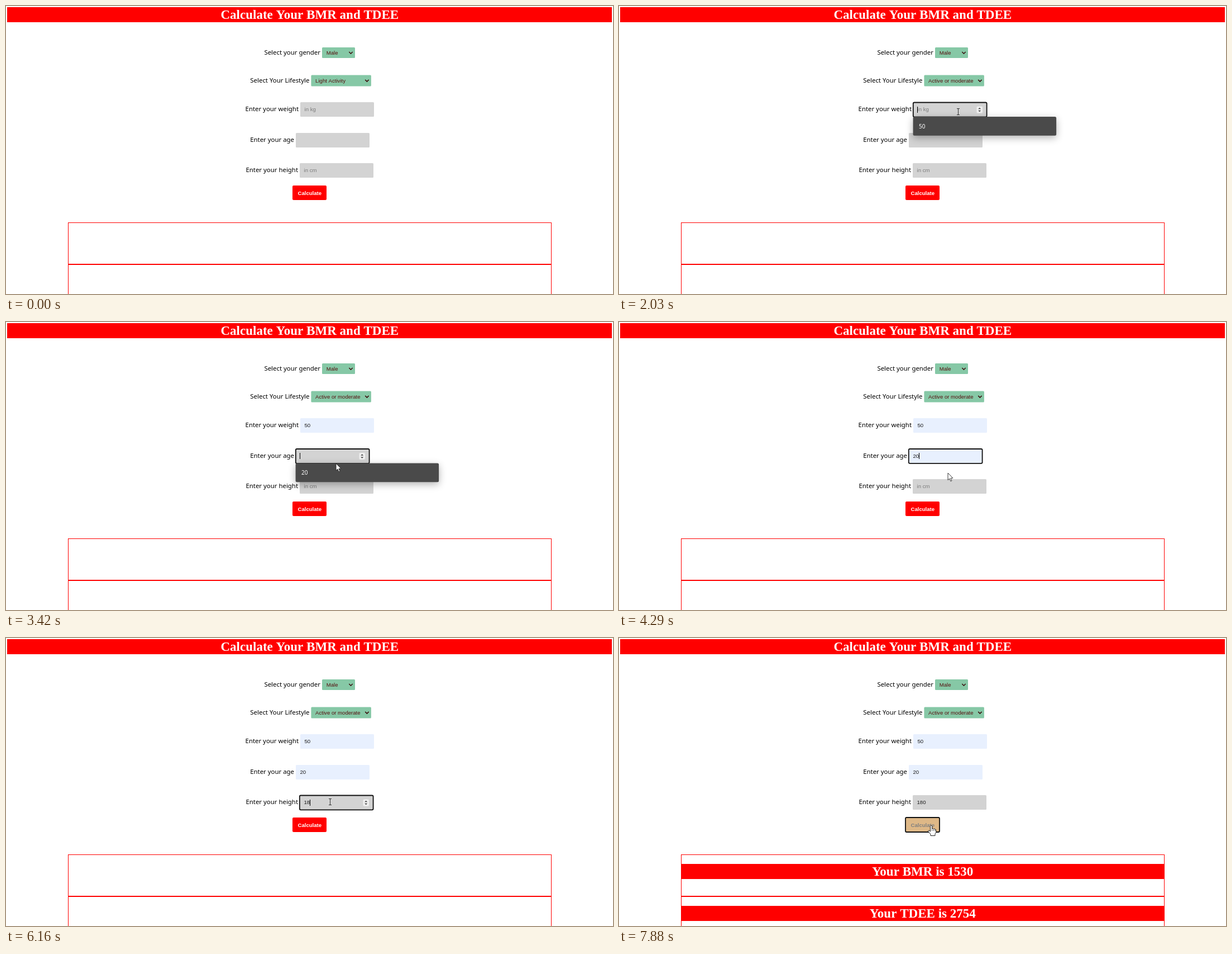
Animation, 1087 px wide and 515 px high, one loop 8 s. Source, as an HTML page with a canvas:

```html
<!DOCTYPE html>
<html lang="en">
<head>
<meta charset="utf-8">
<title>BMR and TDEE calculator</title>
<style>
  html, body { margin: 0; width: 100%; height: 100%; overflow: hidden; background: #fff; }
  canvas { display: block; width: 1087px; height: 515px; }
</style>
</head>
<body>
<canvas id="stage" width="1087" height="515"></canvas>
<script>
const ctx = document.getElementById('stage').getContext('2d');
const LOOP = 8000, STEP = 78, BLINK = 510;
const RED = '#ff0000', GREEN = '#86c8a6', GREY = '#d3d3d3', MAROON = '#560f0f', INK = '#1c1c1c';
const ARIAL = '9.6px "Liberation Sans", Arial, sans-serif';
const SERIF = 'bold 23.05px "Liberation Serif", "Times New Roman", serif';
const LABEL = '11.4px "Noto Sans", sans-serif';
const MENU = '10px "Noto Sans", sans-serif';

// Pointer moves, each starting where the one before ended
const START = { x: 775, y: 452 };
const MOVES = [
  { from: 70, to: 860, x: 594, y: 128 },
  { from: 950, to: 1250, x: 606, y: 174 },
  { from: 1330, to: 1630, x: 607, y: 187 },
  { from: 1780, to: 2030, x: 607, y: 189 },
  { from: 2180, to: 2410, x: 599, y: 212 },
  { from: 2720, to: 3500, x: 590, y: 258 },
  { from: 3600, to: 3980, x: 589, y: 270 },
  { from: 4290, to: 4920, x: 580, y: 293 },
  { from: 7490, to: 7880, x: 559, y: 335 }
];

const OPTIONS = ['Light Activity', 'Active or moderate', 'Vigorously Active'];
const LIST = { x: 546.5, y: 146.5, w: 107.5, row: 25.7, open: 950, close: 1780 };

// focus and blur are clicks; pick takes the offered value, keys type it instead
const FIELDS = [
  { label: 'Enter your weight', x: 527, hint: 'in kg', value: '50', offer: '50',
    focus: 1940, pick: 2720, blur: 3340 },
  { label: 'Enter your age', x: 519, hint: '', value: '20', offer: '20',
    focus: 3340, pick: 3980, blur: 4640 },
  { label: 'Enter your height', x: 526, hint: 'in cm', value: '180', offer: '34',
    focus: 4640, keys: [5700, 6160, 6310], blur: 7800 }
];
FIELDS.forEach((f, i) => { f.y = 172.5 + 54.5 * i; });
const FW = 132, FH = 25.5, MENU_W = 256.5, MENU_H = 33.7, MENU_PAD = 5.5;
const BUTTON = { x: 513, y: 321, w: 61, h: 26, press: 7800, done: 7880 };

const inside = (p, x, y, w, h) => p && p.x >= x && p.x <= x + w && p.y >= y && p.y <= y + h;
const within = (t, a, b) => t >= a && t < b;
const menuOpen = (f, t) => within(t, f.focus + 80, f.pick || f.keys[0]);
const rowHot = (f, t, p) => menuOpen(f, t) &&
  inside(p, f.x, f.y + FH + MENU_PAD, MENU_W, MENU_H - 2 * MENU_PAD);

function pointerAt(t) {
  const i = MOVES.findLastIndex(m => m.from <= t);
  if (i < 0) return null;
  const m = MOVES[i], a = MOVES[i - 1] || START;
  const stepped = Math.floor((t - m.from) / STEP + 0.1) * STEP;
  const k = t >= m.to ? 1 : Math.min(1, stepped / (m.to - m.from));
  return { x: Math.round(a.x + (m.x - a.x) * k), y: Math.round(a.y + (m.y - a.y) * k) };
}

function rect(x, y, w, h, fill, r = 0) {
  ctx.fillStyle = fill;
  ctx.beginPath();
  ctx.roundRect(x, y, w, h, r);
  ctx.fill();
}

function shadowed(x, y, w, h, fill, r, blur, dy, alpha) {
  ctx.save();
  ctx.shadowColor = `rgba(0,0,0,${alpha})`;
  ctx.shadowBlur = blur;
  ctx.shadowOffsetY = dy;
  rect(x, y, w, h, fill, r);
  ctx.restore();
}

function text(s, x, y, font, color, align = 'left') {
  ctx.font = font;
  ctx.fillStyle = color;
  ctx.textAlign = align;
  ctx.fillText(s, x, y);
}

function line(color, width, ...points) {
  ctx.strokeStyle = color;
  ctx.lineWidth = width;
  ctx.beginPath();
  points.forEach(([x, y], i) => i ? ctx.lineTo(x, y) : ctx.moveTo(x, y));
  ctx.stroke();
}

function ring(x, y, w, h) {
  ctx.strokeStyle = '#101010';
  ctx.lineWidth = 1.8;
  ctx.beginPath();
  ctx.roundRect(x, y, w, h, 2);
  ctx.stroke();
}

function banner(s, x, y, w) {
  rect(x, y, w, 27, RED);
  text(s, 543.8, y + 21, SERIF, '#fff', 'center');
}

function select(label, x, y, w, h, value) {
  text(label, x - 3, y + h / 2 + 3.5, LABEL, '#000', 'right');
  rect(x, y, w, h, GREEN, 1.5);
  text(value, x + 7.7, y + h / 2 + 3.5, ARIAL, MAROON);
  const cx = x + w - 7.5, cy = y + h / 2;
  line('#3a0c0c', 1.5, [cx - 3.2, cy - 1.5], [cx, cy + 1.7], [cx + 3.2, cy - 1.5]);
}

function spinner(x, y) {
  rect(x, y, 10.5, 12, '#efefef', 2);
  ctx.fillStyle = '#404040';
  for (const d of [-1, 1]) {
    ctx.beginPath();
    ctx.moveTo(x + 2.7, y + 6 + d * 1.2);
    ctx.lineTo(x + 5.2, y + 6 + d * 3.8);
    ctx.lineTo(x + 7.7, y + 6 + d * 1.2);
    ctx.fill();
  }
}

function field(f, t, p, hover) {
  const { x, y } = f, top = Math.floor(y);
  const focused = within(t, f.focus, f.blur);
  const preview = rowHot(f, t, p) && f.pick, filled = t >= f.pick;
  const typed = (f.keys || []).filter(k => t >= k);
  const value = preview || filled ? f.value : f.value.slice(0, typed.length);

  text(f.label, x - 3, y + 15.5, LABEL, '#000', 'right');
  rect(x, top, FW, 26, preview || filled ? '#e8f0fe' : GREY, 1.5);
  if (focused) ring(x - 0.2, y, FW - 0.2, FH + 0.3);
  if (hover || focused && !filled) spinner(x + FW - 18.5, y + 7);
  text(value || f.hint, x + 7.5, y + 15.8, ARIAL, value ? INK : '#7b7b7b');

  const since = filled ? f.pick : typed.pop() || f.focus;
  if (focused && !preview && Math.floor((t - since) / BLINK) % 2 === 0) {
    const cx = Math.floor(x + 7.5 + (value ? ctx.measureText(value).width : 0));
    rect(cx, Math.round(y + 7), 1, 11, '#000');
  }
}

function menu(f, t, p) {
  if (!menuOpen(f, t)) return;
  const x = f.x - 0.4, y = f.y + FH;
  shadowed(x, y, MENU_W, MENU_H, '#4a4a4a', 2.5, 14, 4, 0.3);
  if (rowHot(f, t, p)) rect(x, y + MENU_PAD, MENU_W, MENU_H - 2 * MENU_PAD, '#575757');
  text(f.offer, x + 10.5, y + 20.8, MENU, '#fff');
}

function list(p) {
  const { x, y, w, row } = LIST;
  shadowed(x, y, w, row * 3, GREEN, 1, 8, 1.5, 0.45);
  const hot = Math.max(0, Math.floor((p.y - y) / row));
  OPTIONS.forEach((s, i) => {
    if (i === hot) rect(x, y + i * row, w, row, '#d0cfcf');
    text(s, x + 7.5, y + i * row + 16.3, ARIAL, i === hot ? INK : MAROON);
  });
}

function button(t, hover) {
  const { x, y, w, h } = BUTTON;
  rect(x, y, w, h, hover ? '#deb887' : RED, 2);
  if (t >= BUTTON.press) ring(x, y, w, h);
  text('Calculate', x + w / 2 + 0.3, y + 16.7, 'bold ' + ARIAL, hover ? '#808080' : '#fff', 'center');
}

function results(t) {
  ['Your BMR is 1530', 'Your TDEE is 2754'].forEach((s, i) => {
    const y = 387 + 75 * i;
    ctx.strokeStyle = RED;
    ctx.lineWidth = 1;
    ctx.strokeRect(111.5, y + 0.5, 865, 74);
    if (t >= BUTTON.done) banner(s, 112, y + 17, 864);
  });
}

function shape(d, width) {
  const path = new Path2D(d);
  ctx.lineJoin = 'round';
  ctx.lineWidth = width;
  ctx.fillStyle = '#fff';
  ctx.strokeStyle = '#222';
  ctx.fill(path);
  ctx.stroke(path);
}

const arrow = () => shape('M0 0V12.6L2.9 10L4.9 14.7L6.9 13.8L5 9.3L8.9 9.1Z', 0.9);

function beam() {
  for (const y of [-5.5, 5.5]) line('#333', 1, [-2, y], [3, y]);
  line('#333', 1, [0.5, -5.5], [0.5, 5.5]);
}

function hand() {
  shape('M-1.5 11V1.5Q0-1.5 1.5 1.5V6Q3.5 4.5 4.3 6.4Q6.5 5.3 7 7.2Q8.8 7 8.8 9' +
    'V13L7 15.4V18.5H-1V16L-5.6 10.4Q-4.5 7.5-1.5 11Z', 1);
  for (let i = 0; i < 3; i++) rect(1.3 + 2.7 * i, 6 + i, 0.8, 4 - i, '#222');
}

function draw(t) {
  const p = pointerAt(t);
  const listOpen = within(t, LIST.open, LIST.close);
  const covered = listOpen || FIELDS.some(f =>
    menuOpen(f, t) && inside(p, f.x, f.y + FH, MENU_W, MENU_H));
  const hovered = covered ? null : FIELDS.find(f => inside(p, f.x, f.y, FW, FH));
  const onButton = !covered && inside(p, BUTTON.x, BUTTON.y, BUTTON.w, BUTTON.h);

  ctx.lineJoin = 'miter';
  rect(0, 0, 1087, 515, '#fff');
  banner('Calculate Your BMR and TDEE', 2, 2, 1083);
  select('Select your gender', 566, 74, 59, 19, 'Male');
  select('Select Your Lifestyle', 546.4, 123.4, 107.5, 20, OPTIONS[t >= LIST.close ? 1 : 0]);
  FIELDS.forEach(f => field(f, t, p, f === hovered));
  button(t, onButton);
  results(t);
  FIELDS.forEach(f => menu(f, t, p));
  if (listOpen) list(p);

  if (!p) return;
  ctx.save();
  ctx.translate(p.x, p.y);
  (hovered ? beam : onButton ? hand : arrow)();
  ctx.restore();
}

const origin = performance.now();
function tick() {
  draw((performance.now() - origin) % LOOP);
  requestAnimationFrame(tick);
}
tick();
</script>
</body>
</html>
```
